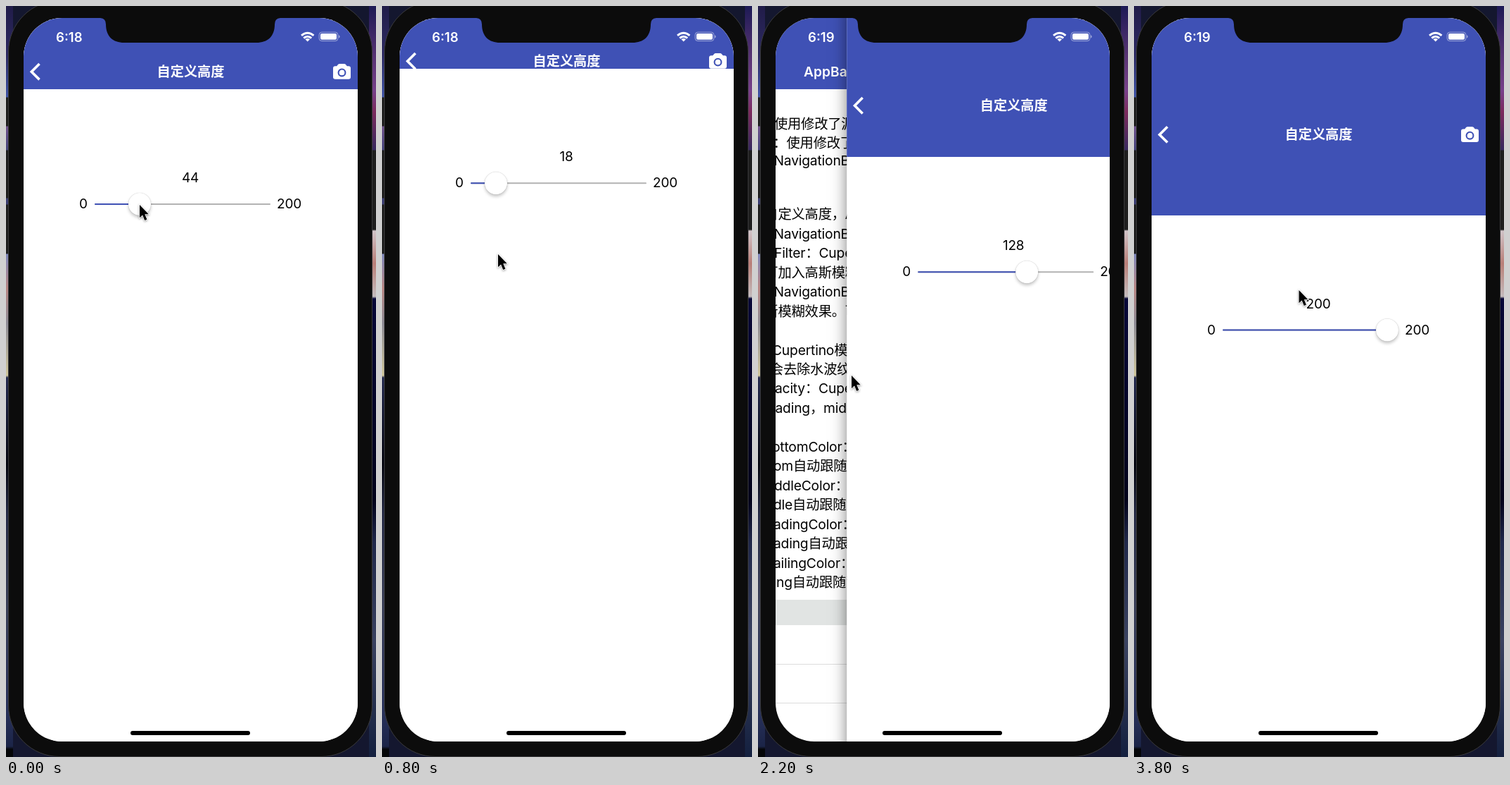
An HTML page that plays this animation: 526 px wide and 1065 px high, repeating every 4 s.

```html
<!DOCTYPE html>
<html lang="zh-CN">
<head>
<meta charset="utf-8">
<style>
html, body { margin: 0; width: 100%; height: 100%; overflow: hidden; background: #14172f; }
#stage { position: relative; width: 526px; height: 1065px; overflow: hidden;
  font: 19px/28px Inter, "Noto Sans CJK SC", "Noto Sans CJK", sans-serif; letter-spacing: -.2px; color: #000; }
#stage div, svg { position: absolute; }
.side { top: 0; width: 10px; height: 1065px; }
#left { left: 0; background: linear-gradient(#211c49 0, #2d2a62 70px, #4055a8 129px, #1e1e1e 130px 170px,
  #70538c 171px, #45447c 204px, #1e1e1e 205px 272px, #3a3d72 273px 281px, #1e1e1e 282px 351px,
  #7f88bb 352px, #b98784 400px, #8e8c96 450px, #d0c79c 524px, #252b50 527px, #05060f 650px,
  #262b46 720px, #3b4058 850px, #29325c 1000px, #1b2447 1050px, #050608 1054px); }
#right { right: 0; background: linear-gradient(#1d1a55 0, #573373 70px, #77408a 120px, #7c2b5d 150px,
  #38295f 204px, #1e1e1e 205px 317px, #d0c4c8 319px, #b97f78 365px, #c4bcbd 412px, #080838 415px,
  #02021a 700px, #20284a 760px, #3a4260 900px, #14203f 1065px); }
#case { left: 3px; top: -8px; width: 516px; height: 1071px; border: 1px solid #3a3a3c; border-radius: 73px; background: #0c0c0c; }
#screen { left: 25px; top: 17px; width: 474.5px; height: 1026px; border-radius: 55px; overflow: hidden; background: #fff; }
.page { left: -25px; top: -17px; width: 526px; height: 1065px; }
#sheet { left: 25px; top: 0; width: 476px; height: 1065px; background: #fff; }
.bar { left: 25px; top: 0; width: 476px; background: #3f51b5; }
.mid { transform: translate(-50%, -50%); white-space: nowrap; }
.title { left: 262.5px; color: #fff; font-weight: 600; font-size: 19.2px; letter-spacing: 0; }
.line { white-space: nowrap; transform: translateY(-50%); font-size: 19.3px; }
.line span { position: absolute; right: 100%; }
.row { left: 25px; width: 476px; }
.track { height: 2.4px; top: -1.2px; border-radius: 2px; }
#thumb { width: 32px; height: 32px; top: -16px; border-radius: 50%; background: #fff;
  box-shadow: 0 0 1px rgba(0,0,0,.3), 0 3px 4px rgba(0,0,0,.22); }
#clock { left: 71px; top: 30px; color: #fff; font-weight: 600; font-size: 18.6px; letter-spacing: 0; }
#home { left: 177px; top: 1028.3px; width: 170px; height: 5.8px; border-radius: 3px; background: #000; }
svg { left: 0; top: 0; overflow: visible; }
</style>
</head>
<body>
<div id="stage">
  <div id="left" class="side"></div>
  <div id="right" class="side"></div>
  <div id="case"></div>
  <div id="screen">
    <div id="under" class="page">
      <div class="bar" style="height:118.3px"></div>
      <div class="title mid" style="top:93px">AppBar使用示例</div>
    </div>
    <div id="top" class="page">
      <div id="sheet"></div>
      <div id="bar" class="bar"></div>
      <div id="head">
        <div class="title mid">自定义高度</div>
        <svg width="1" height="1">
          <path d="M47.5-11.2L36.3 0L47.5 11.2" fill="none" stroke="#fff" stroke-width="3.6"/>
          <path d="M468-8h2.2l2-2.3q.8-.9 2-.9h6.6q1.2 0 2 .9l2 2.3H487q3 0 3 3V7.5q0 3-3 3H468q-3 0-3-3V-5q0-3 3-3z" fill="#fff"/>
          <circle cx="477.5" cy="1.3" r="4.9" fill="#fff" stroke="#3f51b5" stroke-width="2.1"/>
        </svg>
      </div>
      <div id="body">
        <div id="value" class="mid" style="left:262px;top:-37px"></div>
        <div class="mid" style="left:110px">0</div>
        <div class="mid" style="left:402.5px">200</div>
        <div class="track" style="left:126px;width:250px;background:#b3b3b3"></div>
        <div id="fill" class="track" style="left:126px;background:#3f51b5"></div>
        <div id="thumb"></div>
      </div>
    </div>
  </div>
  <svg width="526" height="1065">
    <path d="M134 16V17Q142 17.5 142 26C142 43 152 52 168 52H356C372 52 382 43 382 26Q382 17.5 390 17V16z" fill="#0c0c0c"/>
    <g fill="none" stroke="#fff" stroke-width="3">
      <path d="M420 41.8Q428.7 34.6 437.4 41.8"/>
      <path d="M423.2 45.5Q428.7 41.1 434.2 45.5"/>
    </g>
    <path d="M425.4 47.3Q428.7 44.8 432 47.3L428.7 50.4z" fill="#fff"/>
    <rect x="445.2" y="37.2" width="26.6" height="12.4" rx="3.6" fill="none" stroke="#fff" stroke-opacity=".5"/>
    <rect x="447" y="39" width="23" height="8.8" rx="2" fill="#fff"/>
    <path d="M473 41.2q1.6.6 1.6 2.2t-1.6 2.2z" fill="#fff" opacity=".5"/>
  </svg>
  <div id="clock"></div>
  <div id="home"></div>
  <svg id="cursor" width="1" height="1" style="filter:drop-shadow(0 1.5px 1.5px rgba(0,0,0,.4))">
    <path d="M0 0V18.2L4.1 14.5L7.2 22L10.4 20.7L7.3 13.3H12.8z" fill="#000" stroke="#fff" stroke-width="1.6" paint-order="stroke"/>
  </svg>
</div>
<script>
const $ = id => document.getElementById(id);
const STEP = 200, WIDTH = 474.5, UNIT = 1.144;

// [slider value, pointer x, pointer y, page offset]
const steps = [
  [44, 190, 282, 0], [146, 305, 306, 0], [140, 297, 325, 0], [164, 301, 346, 0],
  [18, 165, 352, 0], [132, 287, 376, 0], [128, 282, 384, 0], [128, 84, 515, 0],
  [128, 43, 517, 0], [128, 27, 517, 0], [128, 230, 522, 200], [128, 133, 524, 101.2],
  [128, 150, 488, 0], [128, 213, 413, 0], [132, 285, 385, 0], [166, 335, 378, 0],
  [200, 368, 397, 0], [200, 361, 398, 0], [200, 234.5, 403, 0], [200, 234.5, 403, 0]
];

// [y, x, hidden start, rest]
const lines = [
  [167, 23, 'appBar：', '使用修改了源码的导航栏'],
  [194, 21.5, 'body', '：使用修改了源码的脚手架'],
  [219, 22.5, 'Cupertino', 'NavigationBar'],
  [295, 28.5, '自', '定义高度，AppBar与'],
  [323, 22.5, 'Cupertino', 'NavigationBar均可使用'],
  [350, 23, 'backdrop', 'Filter：Cupertino模式'],
  [378, 28.5, '下可', '加入高斯模糊效果'],
  [405, 22.5, 'Cupertino', 'NavigationBar自带'],
  [433, 28.5, '高斯', '模糊效果。可以关闭'],
  [488, 20, '', 'Cupertino模式：'],
  [515, 36, '会', '去除水波纹效果'],
  [542, 24, 'op', 'acity：Cupertino模式下'],
  [570, 24.5, 'le', 'ading，middle，trailing'],
  [625, 20, 'b', 'ottomColor：底部颜色'],
  [652, 22, 'bott', 'om自动跟随背景颜色'],
  [680, 23, 'mi', 'ddleColor：中间颜色'],
  [707, 22, 'mid', 'dle自动跟随背景颜色'],
  [735, 22, 'le', 'adingColor：左侧颜色'],
  [762, 22, 'le', 'ading自动跟随背景颜色'],
  [790, 22, 'tr', 'ailingColor：右侧颜色'],
  [817, 26, 'traili', 'ng自动跟随背景颜色']
];

function add(cls, css, html = '') {
  const el = document.createElement('div');
  el.className = cls;
  el.style.cssText = css;
  el.innerHTML = html;
  $('under').append(el);
}

for (const [y, x, start, rest] of lines)
  add('line', `left:${x + 124.4}px;top:${y}px`, `<span>${start}</span>${rest}`);
add('row', 'top:842px;height:36px;background:#e1e4e3');
for (const y of [932.5, 988]) add('row', `top:${y}px;height:1px;background:#dcdcdc`);

const move = (id, x, y) => $(id).style.transform = `translate(${x}px, ${y}px)`;

let shown = -1;
function draw() {
  const i = Math.floor(performance.now() / STEP) % steps.length;
  if (i !== shown) {
    shown = i;
    const [value, px, py, offset] = steps[i];
    const edge = 68 + UNIT * value, knob = 142 + 1.0897 * value;
    $('bar').style.height = edge + 'px';
    move('head', 0, 68 + UNIT * value / 2);
    move('body', 0, edge + 162.7);
    $('value').textContent = value;
    $('fill').style.width = knob - 126 + 'px';
    $('thumb').style.left = knob - 16 + 'px';
    move('top', offset, 0);
    move('under', (offset - WIDTH) / 3, 0);
    $('under').style.visibility = offset ? 'visible' : 'hidden';
    $('sheet').style.boxShadow = offset ? '0 0 20px rgba(0,0,0,.5)' : 'none';
    move('cursor', px, py);
    $('clock').textContent = i < 7 ? '6:18' : '6:19';
  }
  requestAnimationFrame(draw);
}
draw();
</script>
</body>
</html>
```
